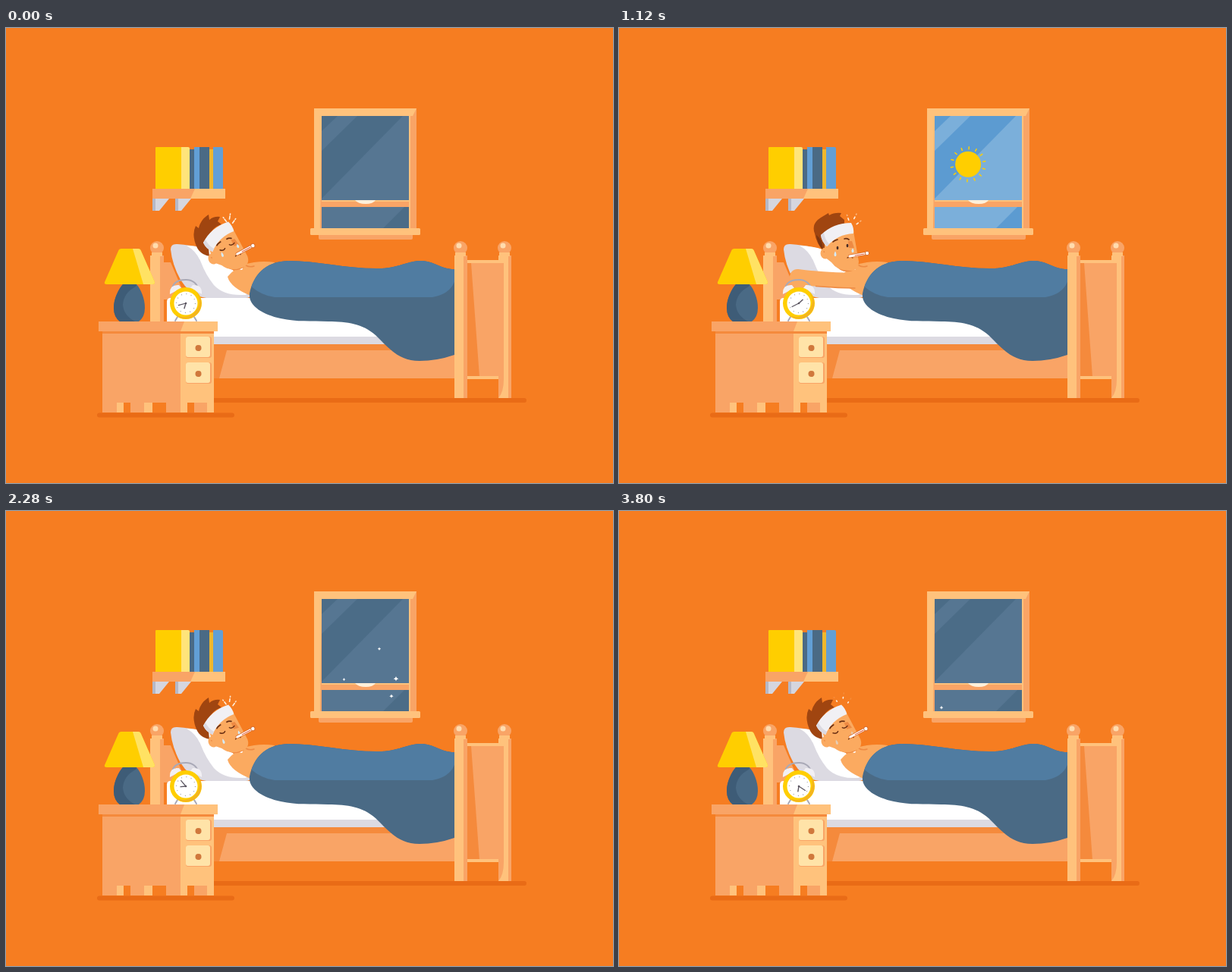
An HTML page that plays this animation: 800x600 px, repeating every 3.84 s.

```html
<!DOCTYPE html>
<html lang="en">
<head>
<meta charset="utf-8">
<title>Sick day</title>
<style>
html, body { margin: 0; width: 100%; height: 100%; overflow: hidden; background: #f67d21; }
svg { display: block; width: 800px; height: 600px; }
.lt { fill: #ffc27c; } .md { fill: #f9a466; } .dk { fill: #f58a3c; }
.navy { fill: #4a6a85; } .sky { fill: #629fd6; } .sun { fill: #ffce00; }
.skin { fill: #fbaa60; } .shade { fill: #ee8a43; } .grey { fill: #dcdae2; }
.line { fill: none; stroke-linecap: round; stroke-linejoin: round; }
</style>
</head>
<body>
<svg viewBox="0 0 800 600">
  <defs>
    <clipPath id="glass"><path d="M416 116H531V227H416ZM416 236H531V264H416Z"/></clipPath>
    <clipPath id="coverClip"><path id="coverEdge"/></clipPath>
    <g id="knob"><circle r="9" class="md"/><path d="M-7 6H7V11H-7Z" class="lt"/><circle cx="-2" cy="-3" r="3.5" fill="#ffdcae"/></g>
    <g id="drawer"><rect x="237" width="34" height="28" rx="3" class="md"/><rect x="237" width="32" height="27" rx="3" fill="#ffe3a8"/><circle cx="253.5" cy="15" r="4" fill="#d0783c"/></g>
  </defs>

  <rect width="800" height="600" fill="#f67d21"/>
  <g stroke="#e96b16" stroke-width="6" stroke-linecap="round"><path d="M270 491H683M123 510.500H298"/></g>

  <!-- shelf -->
  <path class="sun" d="M197 158q0-1 1-1H231V212H197Z"/>
  <path fill="#ffe47a" d="M231 157h9q2 0 2 2V212H231Z"/>
  <path class="navy" d="M242 160h6V212h-6ZM255 157h13V212H255Z"/>
  <path class="sky" d="M248 157h7V212h-7ZM273 157h11q2 0 2 2V212H273Z"/>
  <path fill="#f0b72c" d="M268 160h5V212h-5Z"/>
  <path fill="#d5d6df" d="M193 225h22L202 241h-9ZM223 225h21L231 241h-8Z"/>
  <path fill="#b5b8c7" d="M193 225h4V241h-4ZM223 225h4V241h-4Z"/>
  <path class="md" d="M193 212h96V225h-96Z"/><path class="lt" d="M249 212h40V225h-46Z"/>

  <!-- window -->
  <path class="md" d="M406 106H541V264H406Z"/>
  <path class="lt" d="M406 106H541L536 116H416L414 264H406ZM531 116h2V264h-2Z"/>
  <g clip-path="url(#glass)">
    <rect id="sky" x="416" y="116" width="115" height="148"/>
    <path id="glare" d="M437 116H463L416 162V136ZM523 116H531V227H416V225ZM416 236H525L497 264H416Z"/>
    <g id="sunG"><circle r="17" class="sun"/><path id="rays" class="line" stroke="#ffce00" stroke-width="1.500"/></g>
    <path id="moon" d="M-4-16.500A17 17 0 1 1-4 16.500A17 17 0 0 0-4-16.500Z" fill="#6faadb"/>
    <g id="stars" fill="#fff"></g>
  </g>
  <path class="md" d="M416 227H531V236H416Z"/><path class="lt" d="M416 227H531V229H416Z"/>
  <path d="M460 227H487Q484 232 474 232T460 227Z" fill="#fff0da"/>
  <path class="md" d="M412 272H536V277q0 2-2 2H414q-2 0-2-2Z"/><rect x="401" y="264" width="145" height="9" rx="1.500" class="lt"/>

  <!-- bed -->
  <path class="md" d="M208 309H217L238 358H208Z"/>
  <path class="lt" d="M190 300h18V390h-18Z"/><path class="md" d="M203 300h5V390h-5Z"/>
  <use href="#knob" x="199" y="290"/>
  <path class="md" d="M274 417H592V462H274Z"/><path class="dk" d="M274 417H592V425H291L281 462H274Z"/>
  <path fill="#fff" d="M212 361q0-5 5-5H592V417H212Z"/><path class="grey" d="M212 407H592V417H212Z"/>
  <g id="pillow">
    <path class="grey" d="M217 292Q217 284 226 285Q249 287 265 291L302 322L322 349Q324 356 316 356H264Q243 353 230 332Q219 312 217 292Z"/>
    <path fill="#fff" d="M238 287Q257 288 268 292L302 322L318 349Q319 352 312 352Q287 353 274 339Q263 325 257 309Q251 294 238 287Z"/>
    <path id="puff" fill="#fff" d="M217 292Q217 284 226 286L258 289Q260 315 284 346L246 343Q222 322 217 292Z"/>
  </g>

  <path class="skin" d="M292 328Q301 317 314 312Q333 306 354 309L325 354Q296 343 292 328Z"/>
  <path class="line" stroke="#ee8a43" stroke-width="1.500" d="M316 313q5 3 11 1"/><circle cx="310" cy="317" r="2" fill="#fff"/>

  <path id="hairBed" fill="#a04510" d="M252 290Q244 273 250 261L254 264Q256 253 267 246L268 253Q274 248 282 249L279 255L284 259Q270 263 266 279L268 301Q257 299 252 290Z"/>
  <g id="hairUp"><path fill="#a04510" d="M258 271Q253 258 266 250L276 244L277 247Q284 243 293 244L291 248L297 253V261Q283 262 274 274L270 295Q260 284 258 271Z"/><path fill="#7c3510" d="M260 273Q268 278 269 293Q261 284 260 273Z"/></g>
  <g id="ear"><ellipse cx="272" cy="297" rx="6.500" ry="7.500" class="skin"/><path class="line" stroke="#ee8a43" stroke-width="1.500" d="M270 295q4 1 3 5"/></g>
  <g id="arm"><path id="limb" class="line" stroke="#fbaa60"/><path id="crease" class="line" stroke="#ee8a43" stroke-width="1.300"/></g>

  <g id="head">
    <path class="shade" d="M284 311Q294 318 308 320Q293 325 284 311Z"/>
    <path class="skin" d="M271 284Q285 266 309 268L316 308Q316 319 306 320Q288 321 280 309L271 302Z"/>
    <path class="shade" d="M307 281L310 290H303L302 281Z"/>
    <path fill="#f1f0f4" d="M266 273Q282 257 306 257Q310 264 309 271Q288 272 274 288Q267 282 266 273Z"/>
    <path class="grey" d="M266 273L270 270Q271 278 277 285L274 288Q267 282 266 273Z"/>
    <g class="line" stroke="#6b3014" stroke-width="1.700"><path d="M282 282q2-2 6-3M297 278q3-1 6 1"/>
      <path id="shut" stroke-width="1.400" d="M284 289q4 3 7 0M298 286q3 3 7 0"/><path d="M301 303q4-2 7 0" stroke-width="1.300"/></g>
    <g id="open" fill="#4a2c24"><ellipse cx="288" cy="290" rx="1.400" ry="2.200"/><ellipse cx="301" cy="287" rx="1.400" ry="2.200"/></g>
    <g id="tears" fill="#d4ecfa"><path d="M285 293q-3 6 0 7q3-1 0-7Z"/><path d="M308 289q-3 5 0 6q3-1 0-6Z"/></g>
    <g class="line"><path d="M304 301L327 297" stroke="#d96d2c" stroke-width="4.500"/><path d="M304 301L327 297" stroke="#fff" stroke-width="3"/><circle cx="327" cy="297" r="2.700" fill="#fff" stroke="#d96d2c"/><path d="M311 300l12-2" stroke="#e45b36"/></g>
    <g id="sweat" class="line" stroke="#fff0df" stroke-width="1.600"></g>
  </g>

  <!-- blanket -->
  <g clip-path="url(#coverClip)">
    <path class="navy" d="M315 290H592V445H315Z"/>
    <path fill="#507ca1" d="M315 290H592V332Q586 351 562 355H354Q337 353 322 340Z"/>
  </g>

  <path class="md" d="M608 308H657V462H608Z"/><path class="dk" d="M608 310H613L624 460H608Z"/>
  <path class="lt" d="M608 306H657V310H608ZM608 459H657V463H608Z"/>
  <path class="lt" d="M591 300h17V488h-17ZM649 300h17V488h-17Z"/>
  <path class="md" d="M603 300h5V488h-5ZM662 300h4V488h-4ZM649 310h7V463Q656 480 649 488Z"/>
  <use href="#knob" x="599" y="290"/><use href="#knob" x="657" y="290"/>

  <!-- nightstand -->
  <g id="stand">
    <path class="md" d="M127 398H231V494H127ZM127 493h19v14H127ZM164 493h18v14H164ZM211 493h19v14H211ZM248 493h17v14H248Z"/>
    <path class="lt" d="M230 398H274V507H265V494H239V507H230ZM146 494h9v13h-9ZM182 494h11v13H182Z"/>
    <path class="dk" d="M127 400H274V403H127Z"/>
    <use href="#drawer" y="407"/><use href="#drawer" y="441"/>
    <path class="md" d="M122 387H279V400H122Z"/><path class="lt" d="M235 387H279V400H230Z"/>
    <path class="navy" d="M154 338H172C178 345 183 357 183 369Q183 381 175 387H150Q142 381 142 369C142 357 148 345 154 338Z"/>
    <path fill="#3e5c77" d="M154 338H172L171 341Q155 349 154 365Q155 379 170 387H150Q142 381 142 369C142 357 148 345 154 338Z"/>
    <path class="sun" d="M152 291H174Q177 291 178 294L196 335Q196 338 193 338H133Q129 338 130 335L148 294Q149 291 152 291Z"/>
    <path fill="#ffe263" d="M167 291h7Q177 291 178 294L196 335Q196 338 193 338H181Z"/>
  </g>

  <g id="clock">
    <path class="line" stroke="#a9a9b7" stroke-width="2" d="M-18-18Q-17-31 0-31Q13-31 17-18M-11 18l-3 5M11 18l3 5"/>
    <path fill="#f2f0f4" d="M-21-12Q-22-25-9-24L-6-20ZM21-12Q22-25 9-24L6-20Z"/>
    <circle r="21" class="sun"/><path fill="#f4b51e" d="M14-15A21 21 0 0 1-14 15A17 17 0 0 0 14-15Z"/>
    <circle r="15.500" fill="#fff"/>
    <circle r="12.500" fill="none" stroke="#9aa0ac" stroke-width="1.300" stroke-dasharray="1 5.545"/>
    <path id="hour" class="line" stroke="#5a5560" stroke-width="1.400" d="M0 0V-7"/><path id="minute" class="line" stroke="#5a5560" stroke-width="1.200" d="M0 0V-10"/>
    <circle r="1.300" fill="#5a5560"/>
  </g>
</svg>
<script>
const LOOP = 3840, STEP = 40;
const $ = id => document.getElementById(id);
const set = (id, name, value) => $(id).setAttribute(name, value);
const show = (id, on) => { $(id).style.display = on ? '' : 'none'; };
const mix = (a, b, k) => a + (b - a) * k;
const ease = k => k * k * (3 - 2 * k);

// Value of a keyed track [[time, value...], ...] at time t.
function track(keys, t, curve = ease) {
  let i = 0;
  while (i < keys.length - 1 && keys[i + 1][0] <= t) i++;
  const a = keys[i], b = keys[i + 1];
  if (!b || t < a[0]) return a.slice(1);
  const k = curve((t - a[0]) / (b[0] - a[0]));
  return a.slice(1).map((v, j) => mix(v, b[j + 1], k));
}
const rgb = c => `rgb(${c.map(Math.round)})`;
const blend = (a, b, k) => rgb(a.map((v, i) => mix(v, b[i], k)));

const NIGHT = [75, 108, 135], NIGHT_GLARE = [86, 118, 146];
const DAY = [92, 155, 209], DAY_GLARE = [123, 175, 218];
const daylight = [[160, 0], [400, .4], [640, 1], [1560, 1], [2200, 0]];
const sunKeys = [[200, 565], [400, 544], [760, 506], [1560, 404], [1760, 378]];
const tilt = [[120, -18], [280, 3], [400, 0], [1800, 0], [2080, -18]];
const bounce = [[40, 0], [200, .7], [400, 1], [760, .5], [1080, 0]];
// time, elbow x/y, hand x/y, width
const armKeys = [[600, 305, 330, 308, 322, 22], [760, 262, 326, 270, 291, 30], [880, 240, 292, 250, 288, 27],
  [1000, 270, 328, 232, 337, 21], [1120, 272, 333, 235, 328, 20], [1640, 272, 333, 235, 328, 20],
  [1800, 268, 326, 272, 326, 21], [1960, 305, 330, 308, 326, 20]];
// time seen, x, arc top, radius
const stars = [[1560, 529, 214, 1.5], [2280, 492, 179, 1.5], [2280, 514, 207, 2.3], [2280, 508, 234, 1.8],
  [3240, 461, 196, 1.5], [3240, 459, 237, 2.3], [3800, 425, 236, 1.6]];

const ray = i => {
  const a = i * Math.PI / 7, c = Math.cos(a), s = Math.sin(a);
  return `M${c * 20} ${s * 20}L${c * 23} ${s * 23}`;
};
set('rays', 'd', Array.from({ length: 14 }, (_, i) => ray(i)).join(''));
$('stars').innerHTML = stars.map(() => '<path d="M0-1.500Q.2-.2 1.500 0Q.2.200 0 1.500Q-.2.200-1.500 0Q-.2-.2 0-1.500"/>').join('');

const move = (x, y) => `translate(${x} ${y})`;

function drawSky(t) {
  const [day] = track(daylight, t);
  set('sky', 'fill', blend(NIGHT, DAY, day));
  set('glare', 'fill', blend(NIGHT_GLARE, DAY_GLARE, day));
  const [sx] = track(sunKeys, t, k => k);
  set('sunG', 'transform', move(sx, 178.6 + .00753 * (sx - 472.6) ** 2) + ` rotate(${t * .06})`);
  show('sunG', t > 240 && t < 1760);
  const mx = 541 - .1167 * (t - 2280);
  set('moon', 'transform', move(mx, 171 + .0115 * (mx - 475) ** 2));
  [...$('stars').children].forEach((el, i) => {
    const [at, x0, top, r] = stars[i];
    const x = x0 - .116 * (t - at), size = r * (1 + .15 * Math.sin((t - at) / 130));
    el.setAttribute('transform', move(x, top + .0093 * (x - 475) ** 2) + ` scale(${size})`);
  });
}

function drawClock(t) {
  const ringing = t >= 40 && t < 1000;
  const phase = ((t - 40) % 240) / 240;
  const hop = ringing ? 4 * phase * (1 - phase) : 0;
  const turn = hop * (Math.floor(t / STEP) % 2 ? 8 : -8);
  set('clock', 'transform', move(237 - 3 * hop, 363 - 24 * hop) + ` rotate(${turn})`);
  set('hour', 'transform', `rotate(${197 + .1875 * t})`);
  set('minute', 'transform', `rotate(${255 + 2.239 * t})`);
  const dip = ringing ? 1 - hop : t < 1120 && t >= 1000 ? .6 : 0;
  set('stand', 'transform', `translate(0 507) scale(1 ${1 + .006 * dip}) translate(0 -507)`);
}

function drawMan(t) {
  const [angle] = track(tilt, t), sleep = -angle / 18;
  const pose = `translate(${5 * sleep} ${-4 * sleep}) rotate(${angle} 305 315)`;
  for (const id of ['head', 'hairUp', 'ear']) set(id, 'transform', pose);
  const awake = angle > -9;
  show('open', awake); show('hairUp', awake);
  show('shut', !awake); show('hairBed', !awake);

  const [b] = track(bounce, t);
  set('puff', 'opacity', Math.max(0, 1 - Math.abs(t - 400) / 260));
  const foot = 307 - 9 * b, dent = 317 - 13 * b, low = 439 - 5 * b;
  set('coverEdge', 'd', `M321 350C326 327 340 308 372 307C412 307 450 ${dent + 1} 495 ${dent}`
    + `C518 ${dent - 1} 530 ${foot} 546 ${foot}C565 ${foot} 572 ${318 - 7 * b} 591 ${318 - 7 * b}V${431 - 4 * b}`
    + `Q568 ${low} 545 ${low}C516 ${low} 504 ${421 - 4 * b} 487 ${405 - 3 * b}`
    + `C470 390 450 387 425 387C400 386 385 388 362 383C338 378 319 366 321 350Z`);

  show('arm', t >= 600 && t < 1960);
  const [ex, ey, hx, hy, w] = track(armKeys, t);
  set('limb', 'd', `M322 333Q${ex} ${ey} ${hx} ${hy}L${hx + 3} ${hy + 7}`);
  set('limb', 'stroke-width', w);
  set('crease', 'd', `M311 ${333 + w / 2}Q${(ex + 311) / 2} ${ey + w / 2} ${(ex + hx) / 2 + 6} ${(ey + hy) / 2 + w / 2}`);

  const fall = (t % 480) / 480;
  set('tears', 'transform', move(0, 7 * fall - 1));
  set('tears', 'opacity', fall > .85 ? (1 - fall) / .15 : 1);
  const out = (t % 320) / 320;
  $('sweat').innerHTML = [[304, 257, -1.9], [310, 261, -.65], [308, 255, -1.1]].map(([x, y, a]) => {
    const c = Math.cos(a), s = Math.sin(a), d = 1 + 6 * out, len = 3 * (1 - out) + 1;
    return `<path d="M${x + c * d} ${y + s * d}l${c * len} ${s * len}"/>`
      + `<path d="M${x + c * (d + 6)} ${y + s * (d + 6)}l${c} ${s}" opacity="${1 - out}"/>`;
  }).join('');
}

const start = performance.now();
function frame() {
  const now = (performance.now() - start) % LOOP;
  const t = Math.floor(now / STEP) * STEP;
  drawSky(t);
  drawClock(t);
  drawMan(t);
  requestAnimationFrame(frame);
}
frame();
</script>
</body>
</html>
```
